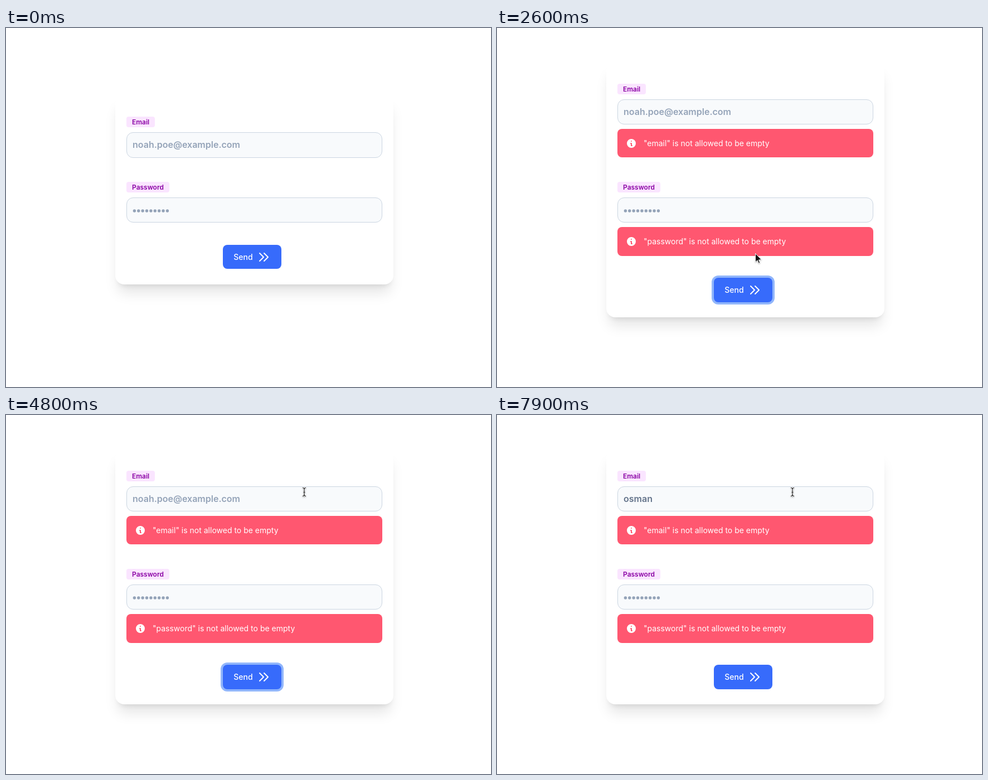
Animation, 870 px wide and 644 px high, one loop 8 s. Source, as an HTML page:

```html
<!DOCTYPE html>
<html lang="en">
<head>
<meta charset="utf-8">
<title>Login form</title>
<style>
  html, body { margin: 0; width: 100%; height: 100%; overflow: hidden; background: #fff; }
  #stage { --d: 0px; position: relative; width: 870px; height: 644px; overflow: hidden; font: 14px/17px Inter, sans-serif; }
  #stage * { position: absolute; box-sizing: border-box; white-space: pre; }
  .card {
    left: 196px; width: 499px; top: calc(120px - var(--d)); height: calc(340px + 2 * var(--d));
    border-radius: 16px; background: #fff;
    box-shadow: 0 20px 25px -5px rgb(0 0 0 / .1), 0 8px 10px -6px rgb(0 0 0 / .1);
  }
  .badge { left: 216px; height: 19px; padding: 2px 10px; border-radius: 4px; background: #fae5ff; color: #8a00a4; font-weight: 600; font-size: 12px; line-height: 15px; }
  .field { left: 216px; width: 459px; height: 45.5px; border: 1px solid #cbd5e1; border-radius: 12px; background: #f8fafc; }
  .value { left: 227px; top: calc(199.25px - var(--d)); font-weight: 600; font-size: 16px; line-height: 20px; color: #94a3b8; }
  .value.typed { color: #64748b; }
  #caret { width: 1px; height: 20px; top: 140px; background: #64748b; }
  .alert { left: 216px; width: 459px; height: 51.25px; border-radius: 8px; background: #ff5770; color: #fff; }
  .alert span { left: 47px; top: 17px; }
  .alert svg { left: 15px; top: 15.6px; }
  .button { left: 389px; top: calc(389px + var(--d)); width: 105px; height: 43.25px; border-radius: 8px; background: #376bfb; color: #fff; font-weight: 500; }
  .button.focus { box-shadow: 0 0 0 4px #91b6fb; }
  .button span { left: 19.3px; top: 13px; }
  .button svg { left: 61px; top: 9.6px; }
  .up { top: calc(var(--y) - var(--d)); }
  .cursor { left: 0; top: 0; overflow: visible; filter: drop-shadow(0 1px 1px rgb(0 0 0 / .3)); }
</style>
</head>
<body>
<div id="stage">
  <div class="card"></div>
  <div class="badge up" style="--y:159px">Email</div>
  <div class="field up" style="--y:187px"></div>
  <div class="value" id="email"></div>
  <div id="caret"></div>
  <div class="alert" style="top:181px"><span>"email" is not allowed to be empty</span></div>
  <div class="badge" style="top:276px">Password</div>
  <div class="field" style="top:303.75px"></div>
  <svg id="dots" width="870" height="644" fill="#94a3b8"></svg>
  <div class="alert" style="top:357.25px"><span>"password" is not allowed to be empty</span></div>
  <div class="button" id="send"><span>Send</span>
    <svg width="24" height="24" fill="none" stroke="#fff" stroke-width="2" stroke-linecap="round" stroke-linejoin="round"><path d="M13 5l7 7-7 7M5 5l7 7-7 7"/></svg>
  </div>
  <svg class="cursor" id="arrow" width="14" height="20"><path d="M.5.5V16l3.6-3.2 2.4 5.4 2.3-1-2.3-5.2 4.9-.3z" fill="#111" stroke="#fff"/></svg>
  <svg class="cursor" id="hand" width="15" height="20"><path d="M3 1.6c1-.9 2.4-.3 2.4 1v4.6l5 .9c1.7.3 2.6 1.2 2.6 2.8l-.5 3.8-1.2 2.3v1.6H4.5V17L1.1 12.3c-.8-1.2.2-2.4 1.4-1.6l.6.5V2z" fill="#000" stroke="#fff"/></svg>
  <svg class="cursor" id="beam" width="8" height="18" fill="none"><g id="bar"><path d="M1 1.5Q4 1.5 4 4V14Q4 16.5 1 16.5M7 1.5Q4 1.5 4 4M4 14Q4 16.5 7 16.5M2.5 9.5H5.5" stroke="#fff" stroke-width="3"/><path d="M1 1.5Q4 1.5 4 4V14Q4 16.5 1 16.5M7 1.5Q4 1.5 4 4M4 14Q4 16.5 7 16.5M2.5 9.5H5.5" stroke="#222" stroke-width="1.2"/></g></svg>
</div>
<script>
const $ = id => document.getElementById(id);
const LOOP = 8000, HINT = 'noah.poe@example.com', NAME = 'osman';
const typedAt = [6000, 6500, 6800, 6900, 7300];

// Pointer poses: start time, left, top, shape
const poses = [
  [800, 145, 509, 'arrow'], [900, 212, 536, 'arrow'], [1000, 241, 546, 'arrow'], [1400, 242, 546, 'arrow'],
  [1800, 264, 534, 'arrow'], [1900, 337, 486, 'arrow'], [2000, 432, 426, 'hand'], [2100, 469, 411, 'hand'], [2200, 455, 407, 'hand'],
  [2600, 463, 404, 'arrow'], [2700, 475, 420, 'arrow'], [2800, 508, 449, 'arrow'], [2900, 548, 481, 'arrow'],
  [3000, 581, 505, 'arrow'], [3100, 600, 517, 'arrow'], [3200, 606, 521, 'arrow'],
  [3900, 640, 540, 'arrow'], [4000, 724, 549, 'arrow'], [4100, 788, 500, 'arrow'], [4200, 799, 360, 'arrow'],
  [4300, 752, 190, 'arrow'], [4400, 684, 102, 'arrow'], [4500, 610, 104, 'arrow'], [4600, 562, 114, 'arrow'], [4700, 536, 127, 'beam'],
  [4800, 531, 129, 'beam'], [5300, 528, 129, 'beam'], [5400, 526, 129, 'beam']
];

for (let i = 0; i < 9; i++)
  $('dots').innerHTML += `<circle cx="${230.4 + i * 7.38}" cy="328" r="2.7"/>`;
for (const alert of document.querySelectorAll('.alert'))
  alert.innerHTML += '<svg width="20" height="20" fill="#fff"><path fill-rule="evenodd" d="M18 10a8 8 0 11-16 0 8 8 0 0116 0zm-7-4a1 1 0 11-2 0 1 1 0 012 0zM9 9a1 1 0 000 2v3a1 1 0 001 1h1a1 1 0 100-2v-3a1 1 0 00-1-1H9z"/></svg>';

const show = (el, on) => { el.style.visibility = on ? 'visible' : 'hidden'; };

function draw(t) {
  const failed = t >= 2600;
  $('stage').style.setProperty('--d', failed ? '59.25px' : '0px');
  document.querySelectorAll('.alert').forEach(el => show(el, failed));
  $('send').classList.toggle('focus', failed && t < 5000);

  const count = typedAt.filter(at => t >= at).length;
  const email = $('email');
  email.textContent = count ? NAME.slice(0, count) : HINT;
  email.classList.toggle('typed', count > 0);
  $('caret').style.left = 227 + (count ? Math.floor(email.getBoundingClientRect().width) : 0) + 'px';
  show($('caret'), t >= 5000 && t < 5600 || t >= 6000 && t < 7900);

  const pose = poses.filter(p => t >= p[0]).pop();
  for (const id of ['arrow', 'hand', 'beam']) {
    const on = pose && pose[3] === id;
    show($(id), on);
    if (on) Object.assign($(id).style, { left: pose[1] + 'px', top: pose[2] + 'px' });
  }
}

const start = performance.now();
function tick() {
  draw((performance.now() - start) % LOOP);
  requestAnimationFrame(tick);
}
tick();
</script>
</body>
</html>
```
